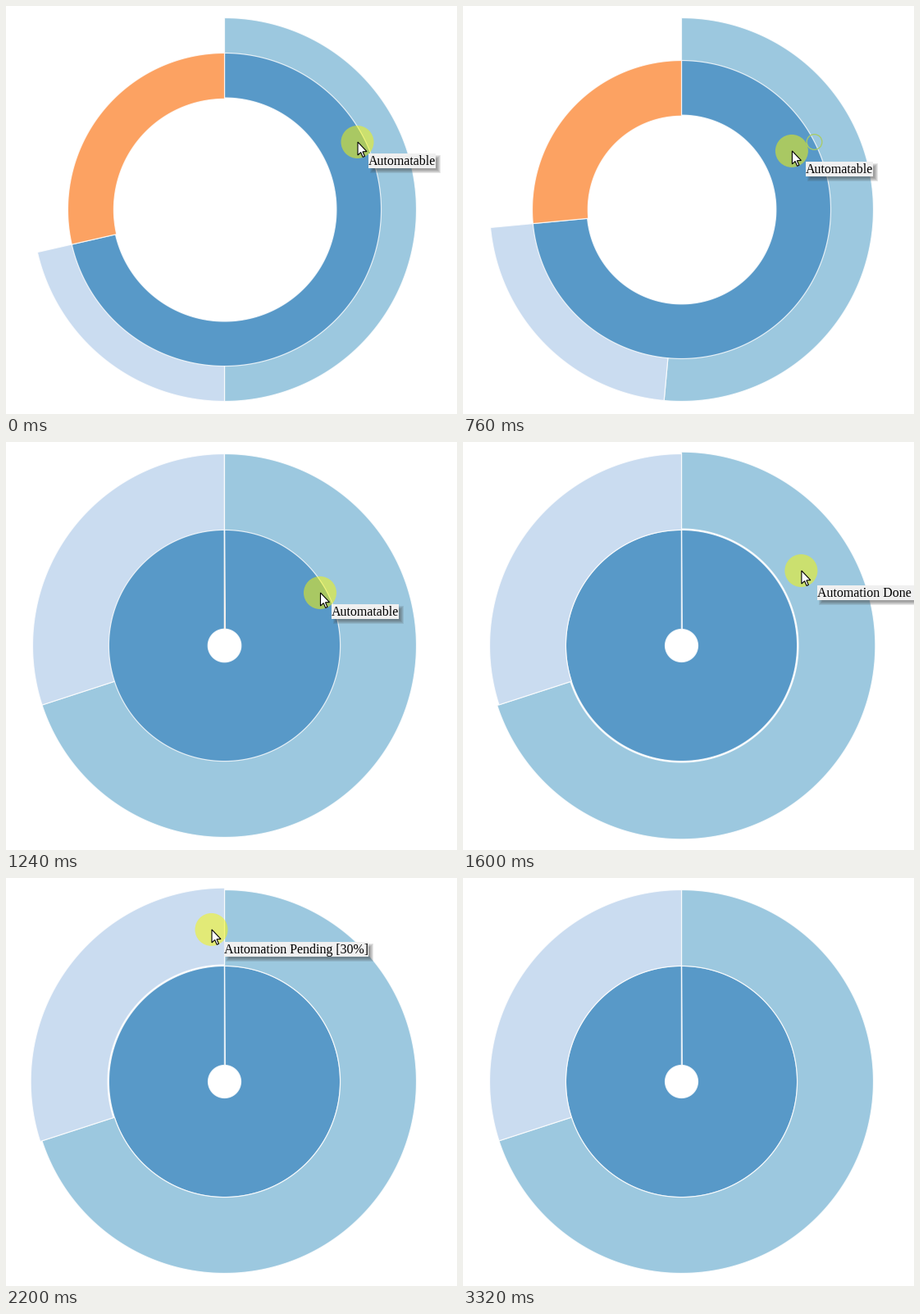
Recreate the animation shown at these times as a matplotlib script. Size 550 px wide and 498 px high, loop 3880 ms.

```python
import numpy as np
import matplotlib.pyplot as plt
from matplotlib.animation import FuncAnimation
from matplotlib.patches import Circle, Polygon, Rectangle

W, H, DPI = 550, 498, 100
STEP, LOOP = 40, 3880
CX, CY, R = 266.5, 248.5, 234
PX = 72 / DPI

SHARE = 5 / 7           # part of the whole held by the blue branch
DONE = 0.7 * SHARE
CLICK, ZOOM_MS = 548, 728
EXIT = 2840
TIP_LAG = 20
START = (428.5, 166)

# name: (start, end, inner level, outer level, colour)
SEGMENTS = {
    "auto": (0, SHARE, 1 / 3, 2 / 3, "#5899c8"),
    "done": (0, DONE, 2 / 3, 1, "#9cc8df"),
    "pending": (DONE, SHARE, 2 / 3, 1, "#cadcf0"),
    "manual": (SHARE, 1, 1 / 3, 2 / 3, "#fca262"),
}
LABELS = {
    "auto": "Automatable",
    "done": "Automation Done [70%]",
    "pending": "Automation Pending [30%]",
}
# pointer moves: start time, end time, destination
MOVES = [
    (520, 940, (383, 184)),
    (1280, 1520, (424, 164)),
    (1540, 1900, (267, 70)),
    (1920, 2420, (239, 58)),
    (2680, 2880, (212, 26)),
]
ARROW = np.array([(0, 0), (0, 16), (3.7, 12.6), (6.2, 18.4), (8.5, 17.4),
                  (6, 11.8), (11, 11.6)])


def smooth(u):
    u = min(max(u, 0), 1)
    return u * u * (3 - 2 * u)


def cubic_in_out(u):
    u = min(max(u, 0), 1)
    return 4 * u ** 3 if u < 0.5 else 1 - 4 * (1 - u) ** 3


def pointer(ms):
    pos = np.array(START, float)
    for t0, t1, goal in MOVES:
        pos += (np.array(goal) - pos) * smooth((ms - t0) / (t1 - t0))
    return pos


def radius(level, zoom):
    """Square-root scale whose domain and range both follow the zoom."""
    low = np.sqrt(zoom / 3)
    inner = 20 * zoom
    return inner + (R - inner) * (np.sqrt(level) - low) / (1 - low)


def ring_points(a0, a1, r0, r1):
    a = np.linspace(a0, a1, 240)
    unit = np.column_stack([np.sin(a), -np.cos(a)])
    return np.vstack([unit * r1, unit[::-1] * r0]) + (CX, CY)


def hovered(ms):
    """Name of the segment under the pointer."""
    if ms >= EXIT:
        return None
    x, y = pointer(ms)
    if ms < CLICK + ZOOM_MS or np.hypot(x - CX, y - CY) < radius(2 / 3, 1):
        return "auto"
    return "done" if x > CX - 1 else "pending"


fig = plt.figure(figsize=(W / DPI, H / DPI), dpi=DPI, facecolor="white")
ax = fig.add_axes([0, 0, 1, 1])
ax.set_xlim(0, W)
ax.set_ylim(H, 0)
ax.axis("off")

rings = {
    name: ax.add_patch(Polygon([(0, 0), (1, 1)], fc=seg[4], ec=(1, 1, 1, 0.8),
                               lw=1.2 * PX, joinstyle="bevel"))
    for name, seg in SEGMENTS.items()
}
ripple = ax.add_patch(Circle(START, 5, fill=False, ec="#a9cc66", lw=1.3 * PX))
glow = ax.add_patch(Circle(START, 20, fc="#faf800", ec="none", alpha=0.5))
shadows = [ax.add_patch(Rectangle((0, 0), 1, 18, fc="#444444", ec="none", alpha=0.13))
           for _ in range(5)]
box = ax.add_patch(Rectangle((0, 0), 1, 18, fc="#f0f0f0", ec="none"))
label = ax.text(0, 0, "", family="Liberation Serif", size=16 * PX, color="black")
arrow = ax.add_patch(Polygon(ARROW, fc="white", ec="black", lw=1.1 * PX))
for z, art in enumerate([*rings.values(), ripple, glow, *shadows, box, label, arrow]):
    art.set_zorder(z + 1)

widths = {}
for key, text in LABELS.items():
    label.set_text(text)
    widths[key] = label.get_window_extent(fig.canvas.get_renderer()).width


def draw_rings(zoom, hover):
    span = 1 + (SHARE - 1) * zoom
    for name, (x0, x1, y0, y1, _) in SEGMENTS.items():
        grow = 1.01 if name == hover else 1
        a0, a1 = (2 * np.pi * min(x / span, 1) for x in (x0, x1))
        r0, r1 = (grow * radius(y, zoom) for y in (y0, y1))
        rings[name].set_xy(ring_points(a0, a1, r0, r1))


def draw_tooltip(ms, hover):
    for art in (*shadows, box, label):
        art.set_visible(hover is not None)
    if hover is None:
        return
    x, y = np.round(pointer(ms - TIP_LAG) + (13.7, 14.5))
    w = widths[hover]
    box.set_bounds(x, y, w, 18)
    for k, shade in enumerate(shadows):
        g = 2 - k
        shade.set_bounds(x + 4 - g, y + 4 - g, w + 2 * g, 18 + 2 * g)
    label.set_text(LABELS[hover])
    label.set_position((x, y + 14))


def update(i):
    ms = i * STEP
    hover = hovered(ms)
    draw_rings(cubic_in_out((ms - CLICK) / ZOOM_MS), hover)
    draw_tooltip(ms, hover)

    tip = pointer(ms)
    glow.center = tip
    arrow.set_xy(ARROW + tip + (0.5, 0))
    for art in (glow, arrow):
        art.set_visible(ms < EXIT)

    age = (ms - CLICK) / 260
    ripple.set_visible(0 < age < 1)
    ripple.set_radius(2 + 9 * age)
    return []


anim = FuncAnimation(fig, update, frames=LOOP // STEP, interval=STEP,
                     init_func=lambda: update(0), repeat=True, repeat_delay=0)
plt.show()
```
